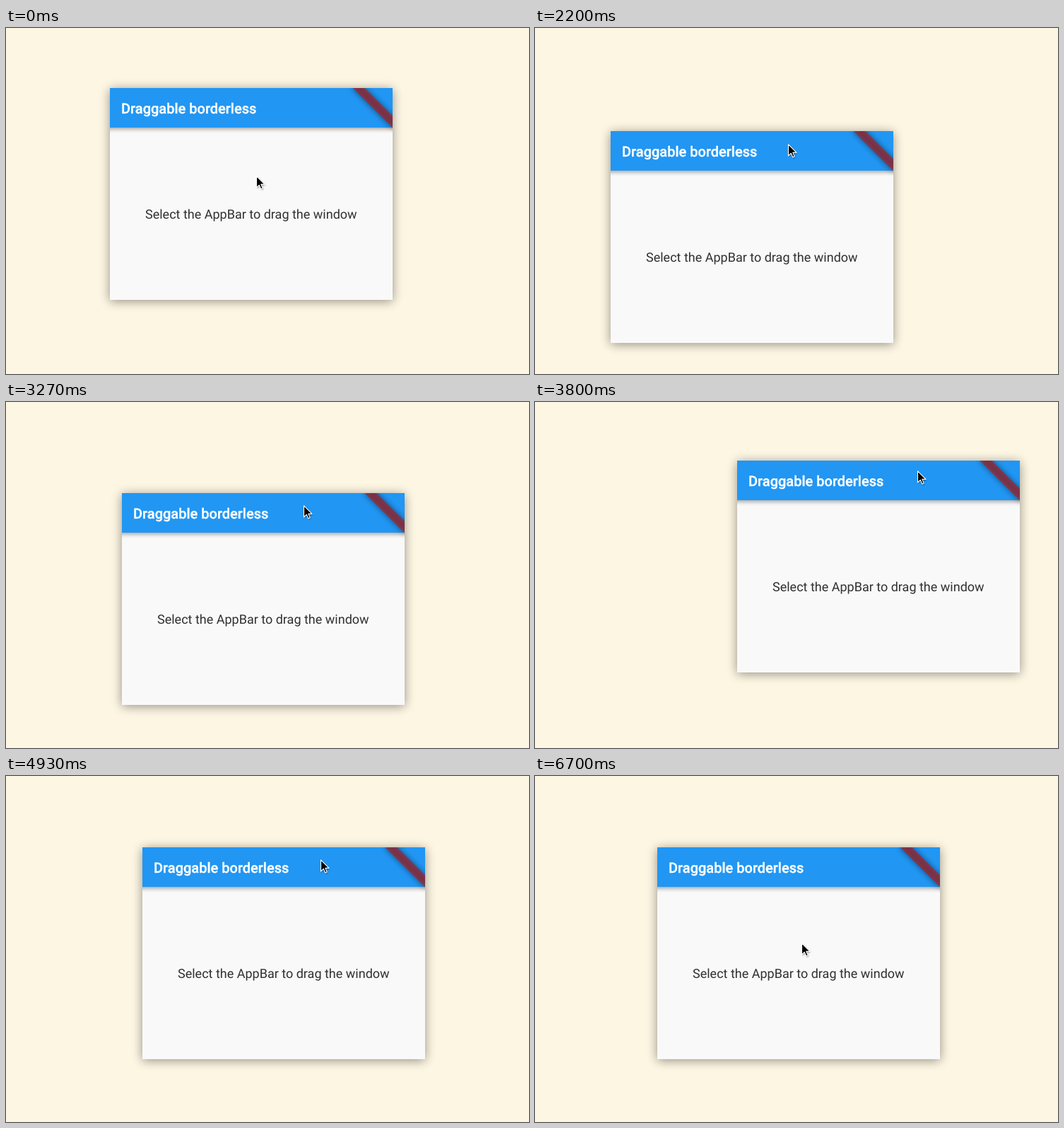
Animation of 740x490 px, one loop 7.96 s. Source, as an HTML page:

```html
<!DOCTYPE html>
<html lang="en">
<head>
<meta charset="utf-8">
<title>Draggable borderless window</title>
<style>
  html, body { margin: 0; width: 100%; height: 100%; overflow: hidden; background: #fdf6e3; }
  svg { display: block; }
  text { font-family: Roboto, sans-serif; text-rendering: geometricPrecision; }
  .title { font-size: 20px; font-weight: 500; fill: #fff; stroke: #fff; stroke-width: .35; }
  .hint { font-size: 18px; fill: #303030; }
</style>
</head>
<body>
<svg width="740" height="490" viewBox="0 0 740 490">
  <defs>
    <filter id="windowBlur" x="-20%" y="-20%" width="140%" height="140%"><feGaussianBlur stdDeviation="7.5"/></filter>
    <filter id="barBlur" x="-10%" y="-50%" width="120%" height="200%"><feGaussianBlur stdDeviation="3"/></filter>
    <filter id="ribbonBlur" x="-30%" y="-150%" width="160%" height="400%"><feGaussianBlur stdDeviation="4"/></filter>
    <filter id="cursorBlur" x="-50%" y="-50%" width="200%" height="200%"><feGaussianBlur stdDeviation="1"/></filter>
    <path id="arrow" d="M.5 .8V17L4.3 13.4L6.8 19L9.2 18L6.8 12.4H12Z"/>
    <rect id="ribbon" x="-40" y="28" width="80" height="12"/>
  </defs>
  <g id="window">
    <rect y="2" width="400" height="300" fill="#000" opacity=".42" filter="url(#windowBlur)"/>
    <svg width="400" height="300">
      <rect width="400" height="300" fill="#f9f9f9"/>
      <rect x="-10" width="420" height="58" fill="#000" opacity=".38" filter="url(#barBlur)"/>
      <rect width="400" height="56" fill="#2196f3"/>
      <text class="title" x="16" y="36">Draggable borderless</text>
      <text class="hint" x="50" y="185">Select the AppBar to drag the window</text>
      <g transform="translate(400 0) rotate(45)">
        <use href="#ribbon" opacity=".5" filter="url(#ribbonBlur)"/>
        <use href="#ribbon" fill="#b71c1c" fill-opacity=".627"/>
      </g>
    </svg>
  </g>
  <g id="cursor">
    <use href="#arrow" x="1" y="1.5" opacity=".45" filter="url(#cursorBlur)"/>
    <use href="#arrow" stroke="#fff" stroke-width="1.1" stroke-linejoin="round"/>
  </g>
</svg>
<script>
const LOOP = 7960;
const FPS = 30;
const GRIP = [253, 16]; // where the pointer holds the title bar
const LEAD = 12;        // ms by which the pointer runs ahead of the window

// Key points: time in ms, x, y
const drag = [
  [1800, 147, 85], [2200, 107, 146], [2360, 60, 165], [2520, 37, 141],
  [2850, 61, 112], [3267, 164, 129], [3367, 204, 133], [3800, 286, 83],
  [3950, 297, 56], [4200, 260, 25], [4500, 213, 39], [4933, 193, 101],
  [5167, 178, 104]
];
const settle = [[5340, 178, 104], [5600, 173, 101]];
const approach = [[340, 354, 209], [800, 431, 140], [1133, 400, 101]];
const leave = [[6100, 426, 117], [6540, 387, 238], [6700, 377, 236]];

// Smooth curve through timed points, at rest at both ends
function follow(path, t) {
  const last = path.length - 1;
  if (t <= path[0][0]) return path[0].slice(1);
  if (t >= path[last][0]) return path[last].slice(1);
  const i = path.findIndex(p => p[0] > t) - 1;
  const a = path[i], b = path[i + 1];
  const span = b[0] - a[0], u = (t - a[0]) / span;
  const slope = (n, axis) => n === 0 || n === last ? 0 :
    (path[n + 1][axis] - path[n - 1][axis]) / (path[n + 1][0] - path[n - 1][0]);
  return [1, 2].map(axis =>
    a[axis] * (1 + 2 * u) * (1 - u) ** 2 +
    b[axis] * u * u * (3 - 2 * u) +
    span * slope(i, axis) * u * (1 - u) ** 2 +
    span * slope(i + 1, axis) * u * u * (u - 1));
}

const windowAt = t => follow(t < settle[0][0] ? drag : settle, t);

function cursorAt(t) {
  if (t < drag[0][0]) return follow(approach, t);
  if (t > leave[0][0]) return follow(leave, t);
  return windowAt(t + LEAD).map((v, axis) => v + GRIP[axis]);
}

function place(id, [x, y]) {
  document.getElementById(id).setAttribute("transform", `translate(${Math.round(x)} ${Math.round(y)})`);
}

function render(time) {
  const t = Math.floor(time * FPS / 1000 + 0.101) * 1000 / FPS;
  place("window", windowAt(t));
  place("cursor", cursorAt(t));
}

const start = performance.now();
function tick(now) {
  render(Math.max(0, now - start) % LOOP);
  requestAnimationFrame(tick);
}
render(0);
requestAnimationFrame(tick);
</script>
</body>
</html>
```
